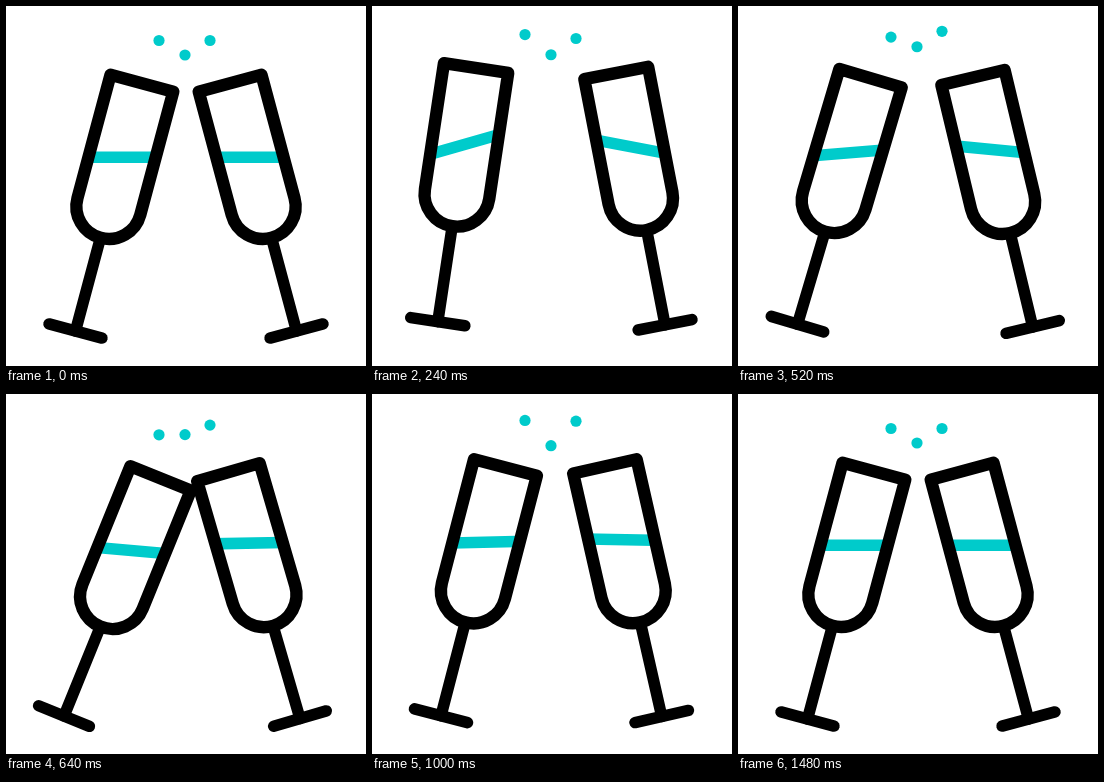
Recreate the animation shown at these times as an HTML page with a canvas. Size 360 by 360 pixels, loop 2040 ms.

```html
<!DOCTYPE html>
<html lang="en">
<head>
<meta charset="utf-8">
<title>Cheers</title>
<style>
  html, body { margin: 0; width: 100%; height: 100%; overflow: hidden; background: #fff; }
  canvas { display: block; width: 360px; height: 360px; }
</style>
</head>
<body>
<canvas id="stage"></canvas>
<script>
const LOOP = 2040, TICK = 40;
const INK = '#000', TEAL = '#00cbcb';
const RADIUS = 32.5, RIM = -256.5, BELLY = -129, LEVEL = -180, FOOT = 27.4;
const BEATS = [400, 600, 840, 1160, 1480]; // out, clink, rebound, settle, still

const canvas = document.getElementById('stage');
const ctx = canvas.getContext('2d');
const ratio = window.devicePixelRatio || 1;
canvas.width = canvas.height = 360 * ratio;

const rad = deg => deg * Math.PI / 180;
const ease = u => u * u * (3 - 2 * u);
const mix = (a, b, k) => a + (b - a) * k;

// Eases from pose to pose, holding the first and last
function poseAt(times, poses, t) {
  const next = times.findIndex(time => time > t);
  if (next <= 0) return poses[next ? poses.length - 1 : 0];
  const k = ease((t - times[next - 1]) / (times[next] - times[next - 1]));
  return poses[next - 1].map((v, i) => mix(v, poses[next][i], k));
}

// A swing is [lean, foot x, foot y, drink tilt], all relative to rest
function makeGlass(start, swings, lastTilt, rise) {
  const still = tilt => [0, 0, 0, tilt, 0];
  const poses = [still(0), ...swings.map(s => [...s, rise]), still(lastTilt), still(0)];
  return t => poseAt([start, ...BEATS], poses, t);
}

const leftGlass = makeGlass(0,
  [[-9.9, -5.7, -14.4, -24.6], [7.75, -12.3, -2.7, 6], [-0.9, -1, -6.5, -7.6]], 5, 1.3);
const rightGlass = makeGlass(60,
  [[-7.4, -4.7, -11.4, -19.7], [1.65, -3.9, -0.1, 2.2], [-4.4, 1.5, -5, -13.6]], 11.5, -2.6);

const bounceTimes = [0, 400, 720, 920, 1280];
const bounce = t => 9.2 * poseAt(bounceTimes, [[0], [-1], [1], [-1], [0]], t)[0];
const bubbles = [
  { x: 153, y: 34.5, delay: 0 },
  { x: 179, y: 49, delay: 200 },
  { x: 204, y: 34.5, delay: 120 }
];

const bowl = new Path2D();
bowl.moveTo(-RADIUS, RIM);
bowl.lineTo(RADIUS, RIM);
bowl.arc(0, BELLY, RADIUS, 0, Math.PI);
bowl.closePath();

function line(x1, y1, x2, y2, color) {
  ctx.beginPath();
  ctx.moveTo(x1, y1);
  ctx.lineTo(x2, y2);
  ctx.strokeStyle = color;
  ctx.lineWidth = 11.5;
  ctx.stroke();
}

function drawGlass([swing, dx, dy, tilt, rise]) {
  const lean = 15 + swing;
  ctx.save();
  ctx.translate(69.5 + dx, 325 + dy);
  ctx.rotate(rad(lean));

  ctx.save();
  ctx.clip(bowl);
  ctx.translate(0, LEVEL + rise);
  ctx.rotate(rad(tilt - lean));
  line(-60, 0, 60, 0, TEAL);
  ctx.restore();

  line(0, BELLY + RADIUS, 0, 0, INK);
  line(-FOOT, 0, FOOT, 0, INK);
  ctx.lineWidth = 12.4;
  ctx.stroke(bowl);
  ctx.restore();
}

function draw(t) {
  ctx.setTransform(ratio, 0, 0, ratio, 0, 0);
  ctx.fillStyle = '#fff';
  ctx.fillRect(0, 0, 360, 360);
  ctx.lineCap = ctx.lineJoin = 'round';

  drawGlass(leftGlass(t));
  ctx.save();
  ctx.translate(360, 0);
  ctx.scale(-1, 1);
  drawGlass(rightGlass(t));
  ctx.restore();

  ctx.fillStyle = TEAL;
  for (const { x, y, delay } of bubbles) {
    ctx.beginPath();
    ctx.arc(x, y + bounce(t - delay), 5.6, 0, 2 * Math.PI);
    ctx.fill();
  }
}

const start = performance.now();
function frame() {
  const t = (performance.now() - start) % LOOP;
  draw(Math.floor(t / TICK) * TICK);
  requestAnimationFrame(frame);
}
frame();
</script>
</body>
</html>
```
